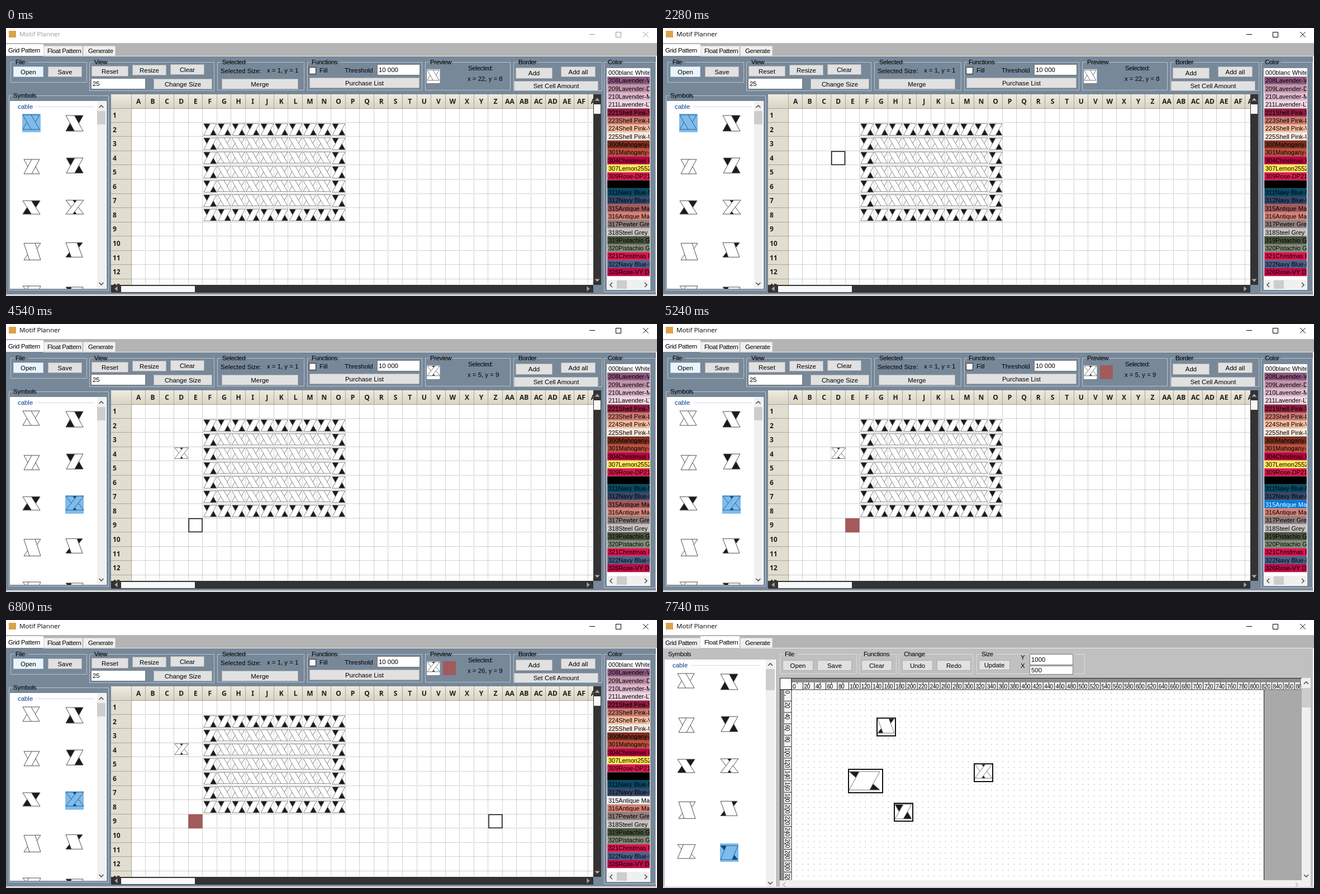
Write an HTML page that moves like this. It is 1165 px wide and 481 px high and loops after 8000 ms.

```html
<!DOCTYPE html>
<html lang="en">
<head>
<meta charset="utf-8">
<title>Motif Planner</title>
<style>
html, body { margin: 0; width: 100%; height: 100%; overflow: hidden; background: #fff; }
svg { display: block; width: 100vw; height: 100vh; }
text { font: 11.4px "Liberation Sans", Arial, sans-serif; fill: #000; white-space: pre; }
text.n { letter-spacing: -.36px; }
text.title { font: 11.6px "Open Sans", "Noto Sans", sans-serif; }
text.head { font: bold 12px "Noto Sans", sans-serif; fill: #1c1c1c; }
text.list { font-size: 11px; }
text.rule { font-size: 10px; }
.mid { text-anchor: middle; }
</style>
</head>
<body>
<svg id="stage" viewBox="0 0 1165 481" xmlns="http://www.w3.org/2000/svg"></svg>
<script>
const LOOP = 8000, PITCH = 25.56, GX = 224.3, GY = 144.2, UNIT = 1.0232;
const ROSE = '#a35a5b', SLATE = '#778899';

const range = n => [...Array(n).keys()];
const rect = (x, y, w, h, fill, extra = '') =>
  `<rect x="${x}" y="${y}" width="${w}" height="${h}" fill="${fill}" ${extra}/>`;
const box = (x, y, w, h, fill, stroke, width = 1, extra = '') =>
  rect(x + .5, y + .5, w - 1, h - 1, fill, `stroke="${stroke}" stroke-width="${width}" ${extra}`);
const path = (d, stroke, width = 1, extra = '') =>
  `<path d="${d}" fill="none" stroke="${stroke}" stroke-width="${width}" ${extra}/>`;
const text = (x, y, s, cls = '', extra = '') =>
  `<text x="${x}" y="${y + 4}" class="${cls}" ${extra}>${s}</text>`;
const button = (x, y, w, h, s, id = '') =>
  box(x, y, w, h, '#e1e1e1', '#adadad', 1, id && `id="${id}"`) + text(x + w / 2, y + h / 2, s, 'mid');
const input = (x, y, w, h, s) => box(x, y, w, h, '#fff', '#7a7a7a') + text(x + 3, y + h / 2 - .5, s);
const group = (x, y, w, h, s, tx, line) =>
  path(`M${tx - 2} ${y}.5H${x}.5V${y + h}.5H${x + w}.5V${y}.5H${tx + s.length * 5.3 + 2}`, line) +
  text(tx, y, s, 'n');
const chevron = (x, y, turn, color = '#505050') =>
  path('M-4 2L0 -2L4 2', color, 1.6, `transform="translate(${x} ${y}) rotate(${turn})"`);
const arrow = (x, y, turn) =>
  `<path d="M-4.5 2.5L0 -2.5L4.5 2.5Z" fill="#aaa" transform="translate(${x} ${y}) rotate(${turn})"/>`;
const clip = (id, x, y, w, h) => `<clipPath id="${id}">${rect(x, y, w, h, '#000')}</clipPath>`;

// Cable symbols: [front strand share, lean, dark back strand]; share 0 means three strands.
const KINDS = [[.5, 1, 0], [.5, 1, 1], [.5, -1, 0], [.5, -1, 1], [.5, 1, 1],
  [0], [.67, 1, 0], [.67, 1, 1], [.67, -1, 0], [.67, -1, 1]];

function symbol(kind, x, y, w, h, line = '#4c4c4c', width = 1) {
  const [front, lean, dark] = KINDS[kind];
  const poly = (pts, fill, flip) => `<polygon points="${pts.map(([u, v]) =>
    `${(x + (flip ? 1 - u : u) * w).toFixed(2)},${(y + v * h).toFixed(2)}`).join(' ')}" fill="${fill}" stroke="${line}" stroke-width="${width}"/>`;
  if (!front) {
    const a = .39, strand = [[0, 0], [a, 0], [1, 1], [1 - a, 1]];
    return poly([[a, 0], [1 - a, 0], [.5, .2]], '#111') + poly([[a, 1], [1 - a, 1], [.5, .8]], '#111') +
      poly(strand, '#fff') + poly(strand, '#fff', true);
  }
  const back = 1 - front, flip = lean < 0;
  return poly([[front, 0], [1, 0], [back, 1], [0, 1]], dark ? '#1a1a1a' : '#fff', flip) +
    poly([[0, 0], [front, 0], [1, 1], [back, 1]], '#fff', flip);
}

// Symbol boxes inside their 33 px picture; the sheet shows the same pictures smaller.
const ICON = 33;
const ICONS = [[1, 2, 30, 26], [1, 3, 31, 28], [3, 5, 28, 26], [2, 2.5, 30, 27], [1, 2.5, 31, 24],
  [1, 1.5, 32, 25], [3, 2, 30, 30], [1, 1, 30, 26], [1, 2, 32, 25], [1, 4, 31, 25]];
const iconAt = i => [i % 2 ? 106 : 29, 154 + 76.75 * (i >> 1)];

function stamp(kind, x, y, size, line, width) {
  const [dx, dy, w, h] = ICONS[kind].map(v => v * size / ICON);
  return rect(x, y, size, size, '#fff') + symbol(kind, x + dx, y + dy, w, h, line, width);
}
const palette = () => ICONS.map((b, i) => stamp(i, ...iconAt(i), ICON)).join('');
const picked = (i, id) => rect(...iconAt(i), ICON, ICON, '#0078d7', `opacity=".5" id="${id}"`);
const heading = (x, y, end) => text(x, y, 'cable', '', 'style="fill:#003c8c"') +
  path(`M${x + 33} ${y}.5H${end}`, '#c9dcec');

function tabs(active) {
  return rect(0, 27, 1165, 23, '#b4b4b4') + [['Grid Pattern', 0, 67], ['Float Pattern', 67, 70], ['Generate', 138, 58]]
    .map(([s, x, w], i) => i === active
      ? rect(x, 29, w, 22, '#fff') + text(x + (i ? 7 : 4), 39.5, s, 'n')
      : box(x, 32, w, 18, '#f0f0f0', '#d9d9d9', 1, `id="tab${active}${i}"`) + text(x + (i === 2 ? 9 : i ? 7 : 4), 41, s, 'n'))
    .join('');
}

function titleBar() {
  return rect(0, 0, 1165, 481, '#fff') + rect(5, 5, 13, 12, '#dda24a') +
    text(24, 11, 'Motif Planner', 'title', 'id="title"') +
    `<g id="winButtons" fill="none" stroke="#000"><path d="M1044 11.5h10M1091.5 7.5h9v9h-9zM1140 7l9.5 9.5M1149.5 7l-9.5 9.5"/></g>`;
}

const COLORS = `000blanc White|#fff,208Lavender-VY DK|#8d5a80,209Lavender-DK|#c294ab,210Lavender-MD|#dcb8cb,211Lavender-LT|#eed7e1,
221Shell Pink-VY DK|#8f1f41,223Shell Pink-LT|#ca7b70,224Shell Pink-VY LT|#f3bd9f,225Shell Pink-UL LT|#faeae0,300Mahogany-VY DK|#7d3021,
301Mahogany-MD|#b95040,304Christmas Red|#b5043f,307Lemon2552|#ffe65c,309Rose-DP2154|#d91c52,310Black|#000,311Navy Blue-MD|#0a4a64,
312Navy Blue-LT|#38486a,315Antique Mauve|${ROSE},316Antique Mauve|#d48379,317Pewter Grey|#8f7f7f,318Steel Grey -LT|#c6c0c0,
319Pistachio Green|#48523f,320Pistachio Green|#828d7a,321Christmas Red|#d9154f,322Navy Blue-LT|#4c6187,326Rose-VY DK|#be0d49`
  .split(',').map(s => s.trim().split('|'));

function colorList() {
  const rows = COLORS.map(([s, c], i) => {
    const y = 72.9 + i * 14.32, id = s.startsWith('315') ? ['id="pickRow"', 'id="pickText"'] : ['', ''];
    return rect(1076, y, 76, 14.4, c, id[0]) + text(1078, y + 7.2, s, 'list', id[1]);
  }).join('');
  return rect(1075, 72, 78, 398, '#fff') + `<g clip-path="url(#listClip)">${rows}</g>` +
    rect(1076, 452, 76, 17, '#f0f0f0') + rect(1093, 453, 18, 15, '#cdcdcd') +
    chevron(1083, 461, -90) + chevron(1145, 461, 90);
}

const colName = i => i < 26 ? String.fromCharCode(65 + i) : 'A' + colName(i - 26);
const cell = (c, r) => [GX + (c - 1) * PITCH, GY + (r - 1) * PITCH];

function sheet() {
  let s = rect(188, 119, 863, 342, '#fff') + rect(188, 119, 863, 25, 'url(#header)') + rect(188, 144, 36, 317, '#e2decf');
  let lines = '', edges = 'M188 144.5H1051M224.5 119V461';
  range(33).forEach(i => {
    const x = Math.round(GX + (i + 1) * PITCH) - .5;
    lines += `M${x} 145V461`;
    edges += `M${x} 119V144`;
    s += text(GX + (i + .5) * PITCH, 131.5, colName(i), 'head mid');
  });
  range(13).forEach(i => {
    const y = Math.round(GY + (i + 1) * PITCH) - .5;
    lines += `M225 ${y}H1051`;
    edges += `M188 ${y}H224`;
    s += text(191, GY + (i + .5) * PITCH, i + 1, 'head');
  });
  for (let r = 2; r <= 8; r++) for (let c = 6; c <= 15; c++) {
    const rim = r === 2 || r === 8 || c === 6 || c === 15;
    s += stamp(rim ? 3 : 0, ...cell(c, r), PITCH, '#777', .9);
  }
  const [ex, ey] = cell(5, 9);
  s += `<g id="placed">${stamp(5, ...cell(4, 4), PITCH, '#666', .9)}</g>` +
    path(lines, '#a4a4a4', 1, 'stroke-dasharray="1 1"') + path(edges, '#aaa594') +
    rect(ex - .3, ey, 25.5, 25.5, ROSE, 'id="painted"') +
    `<g id="cursor">${rect(.7, .7, 23.8, 23.8, '#fff', 'stroke="#111" stroke-width="1.5"')}${rect(6, 1.5, 1.4, 14, '#000', 'id="caret"')}</g>`;
  return `<g clip-path="url(#sheetClip)">${s}</g>` +
    rect(188, 461, 863, 14, '#333') + rect(206, 463, 132, 11, '#f8f8f8') + arrow(197, 468, -90) + arrow(1042, 468, 90) +
    rect(1051, 461, 14, 14, SLATE) + rect(1051, 119, 14, 342, '#333', 'id="track"') +
    rect(1052, 137, 12, 17, '#f8f8f8') + arrow(1058, 128, 0) + arrow(1058, 453, 180);
}

function gridView() {
  const g = (...a) => group(...a, '#b9c3cc');
  return tabs(0) + rect(0, 50, 1163, 428, SLATE) + path('M67 50.5H1163', '#e8e8e8') +
    g(8, 61, 136, 36, 'File', 17) + button(13, 69, 54, 19, 'Open', 'open') + button(75, 69, 61, 19, 'Save') +
    g(149, 61, 223, 51, 'View', 158) + button(153, 68, 66, 19, 'Reset') + button(226, 66, 61, 19, 'Resize') +
    button(294, 65, 61, 19, 'Clear', 'clear') + input(152, 90, 98, 20, '25') + button(264, 91, 105, 19, 'Change Size') +
    g(378, 61, 155, 50, 'Selected', 387) + text(384, 77, 'Selected Size:') + text(467, 76, 'x = 1, y = 1') + button(386, 91, 137, 19, 'Merge') +
    g(539, 61, 205, 50, 'Functions', 547) + box(542, 70, 13, 13, '#fff', '#222') + text(561, 76, 'Fill') + text(606, 76, 'Threshold') +
    input(664, 65, 77, 20, '10 000') + button(543, 89, 197, 19, 'Purchase List') +
    g(750, 61, 152, 50, 'Preview', 759) + rect(753, 74, 23, 25, '#fff') +
    `<g id="previewA">${stamp(0, 753, 74, 23.5, '#666', .9)}</g><g id="previewB">${stamp(5, 753, 74, 23.5, '#666', .9)}</g>` +
    rect(782, 74, 23, 25, ROSE, 'id="swatch"') + text(827, 72, 'Selected:', 'n') + text(826, 91, '', '', 'id="coords"') +
    g(908, 61, 158, 51, 'Border', 917) + button(912, 71, 66, 20, 'Add') + button(993, 69, 62, 19, 'Add all') + button(909, 95, 151, 18, 'Set Cell Amount') +
    g(1070, 61, 92, 412, 'Color', 1077) + colorList() +
    g(5, 121, 178, 349, 'Symbols', 13) + rect(7, 131, 173, 337, '#fff') + heading(21, 141, 158) +
    `<g clip-path="url(#iconClip)">${palette() + picked(0, 'pickA') + picked(5, 'pickB')}</g>` +
    rect(163, 132, 15, 335, '#f0f0f0') + rect(163, 149, 15, 24, '#cdcdcd') + chevron(170.5, 141, 0) + chevron(170.5, 459, 180) +
    sheet();
}

function rulers() {
  let top = '', side = '', labels = '';
  range(446).forEach(i => {
    const p = i * 2 * UNIT, long = i % 10 === 0 ? 21 : i % 5 === 0 ? 11 : 8;
    top += `M${(230 + p).toFixed(1)} 104v${long}`;
    if (p < 342) side += `M209 ${(125 + p).toFixed(1)}h${long}`;
    if (long === 21) {
      labels += text((232 + p).toFixed(1), 119, i * 2, 'rule n');
      if (p < 342) labels += `<text class="rule n" transform="translate(218.5 ${(127 + p).toFixed(1)}) rotate(90)">${i * 2}</text>`;
    }
  });
  return rect(209, 104, 934, 363, '#fff') + rect(230, 104, 913, 21, '#f4f4f4') + rect(209, 125, 21, 342, '#f4f4f4') +
    `<g clip-path="url(#rulerClip)">${path(top + side, '#222', 1) + labels}</g>` + path('M209 104.5H1143M209.5 104V467M209 125H1143M230 104V467', '#222');
}

const framed = (kind, x, y, w, h, inner) =>
  rect(x, y, w, h, '#fff', 'stroke="#111" stroke-width="2"') + symbol(kind, ...inner, '#777', 1);

function floatView() {
  const g = (...a) => group(...a, '#dcdcdc');
  return tabs(1) + rect(0, 50, 1163, 428, '#c0c0c0') + path('M0 50.5H67M137 50.5H1163', '#f0f0f0') +
    text(9, 61, 'Symbols', 'n') + rect(3, 71, 199, 407, '#fff') + heading(17, 81, 173) +
    `<g transform="translate(-4 -60)">${palette() + picked(9, 'pickC')}</g>` +
    rect(184, 71, 16, 407, '#f0f0f0') + rect(184, 88, 16, 38, '#cdcdcd') + chevron(192, 80, 0) + chevron(192, 472, 180) +
    g(209, 61, 137, 35, 'File', 218) + button(214, 72, 55, 19, 'Open') + button(276, 72, 62, 19, 'Save') +
    g(351, 61, 66, 35, 'Functions', 359) + button(355, 72, 55, 19, 'Clear') +
    g(422, 61, 132, 35, 'Change', 431) + button(428, 72, 55, 19, 'Undo') + button(490, 72, 61, 19, 'Redo') +
    g(561, 61, 193, 35, 'Size', 570) + button(565, 72, 56, 18, 'Update') +
    text(640, 67, 'Y') + text(640, 82, 'X') + input(656, 61, 78, 20, '1000') + input(656, 82, 78, 16, '500') +
    rulers() + rect(231, 126, 844, 341, 'url(#dots)') + rect(1076, 126, 67, 341, '#a9a9a9') + path('M1075.5 125V467', '#222') +
    framed(7, 383, 176, 33, 32, [384, 177, 30, 26]) + framed(9, 332, 268, 61, 42, [333, 272, 55, 33]) +
    framed(5, 557, 258, 33, 32, [558, 259, 31, 25]) + framed(3, 414, 329, 33, 32, [415, 331, 30, 26]) +
    rect(1143, 104, 16, 363, '#f0f0f0') + rect(1143, 122, 16, 35, '#cdcdcd') + chevron(1151, 113, 0) + chevron(1151, 459, 180) +
    rect(209, 467, 950, 11, '#f0f0f0') + chevron(217, 475, -90, '#bbb') + chevron(1134, 475, 90, '#bbb');
}

document.getElementById('stage').innerHTML = `<defs>
  <linearGradient id="header" x2="0" y2="1"><stop stop-color="#eeebe0"/><stop offset="1" stop-color="#d9d4c3"/></linearGradient>
  <pattern id="dots" x="230" y="122" width="${10 * UNIT}" height="${10 * UNIT}" patternUnits="userSpaceOnUse">${rect(9, 9, 1, 1, '#555')}</pattern>
  ${clip('listClip', 1076, 72, 76, 380) + clip('sheetClip', 188, 119, 863, 342) + clip('iconClip', 7, 131, 156, 337) + clip('rulerClip', 209, 104, 933, 363)}
  </defs>${titleBar()}<g id="grid">${gridView()}</g><g id="float">${floatView()}</g>${path('M0 479.5H1165', '#a0a0a0')}`;

const $ = id => document.getElementById(id);
const show = (id, on) => $(id).setAttribute('display', on ? 'inline' : 'none');
const paint = (id, fill, stroke) => {
  $(id).setAttribute('fill', fill);
  if (stroke) $(id).setAttribute('stroke', stroke);
};
paint('open', '#ebf4fb', '#b5d3ea');

const CARET = [[2370, 2900], [4010, 4540], [5100, 5240], [6100, 6630], [7180, 7660]];

function draw(t) {
  const within = (a, b) => t >= a && t < b;
  show('grid', t < 7740);
  show('float', t >= 7740);

  const ink = t < 2280 ? '#999' : '#000';
  $('title').style.fill = ink;
  $('winButtons').setAttribute('stroke', ink);
  paint('track', within(250, 490) || within(5560, 5640) ? '#444' : '#333');

  const at = within(2280, 3370) ? [4, 4] : within(3940, 5240) ? [5, 9] : t >= 6020 ? [26, 9] : null;
  show('cursor', at);
  if (at) $('cursor').setAttribute('transform', `translate(${cell(...at).join(' ')})`);
  show('caret', CARET.some(([a, b]) => within(a, b)));
  const [cx, cy] = t < 2370 ? [22, 8] : t < 4010 ? [4, 4] : t < 6100 ? [5, 9] : [26, 9];
  $('coords').textContent = `x = ${cx}, y = ${cy}`;

  const placed = t >= 3370, painted = t >= 5240, focused = within(5240, 6020);
  show('pickA', !placed);
  show('previewA', !placed);
  for (const id of ['pickB', 'previewB', 'placed']) show(id, placed);
  show('painted', painted);
  show('swatch', painted);
  paint('pickRow', !painted ? ROSE : focused ? '#0078d7' : '#f0f0f0');
  $('pickText').style.fill = focused ? '#fff' : '#000';

  const hover = within(6430, 6800);
  paint('clear', hover ? '#e5f1fb' : '#e1e1e1', hover ? '#0078d7' : '#adadad');
  paint('tab01', t < 7100 ? '#f0f0f0' : t < 7180 ? '#e8eff5' : t < 7270 ? '#dfecf7' : '#d8eaf9');
}

function tick() {
  draw(performance.now() % LOOP);
  requestAnimationFrame(tick);
}
tick();
</script>
</body>
</html>
```
